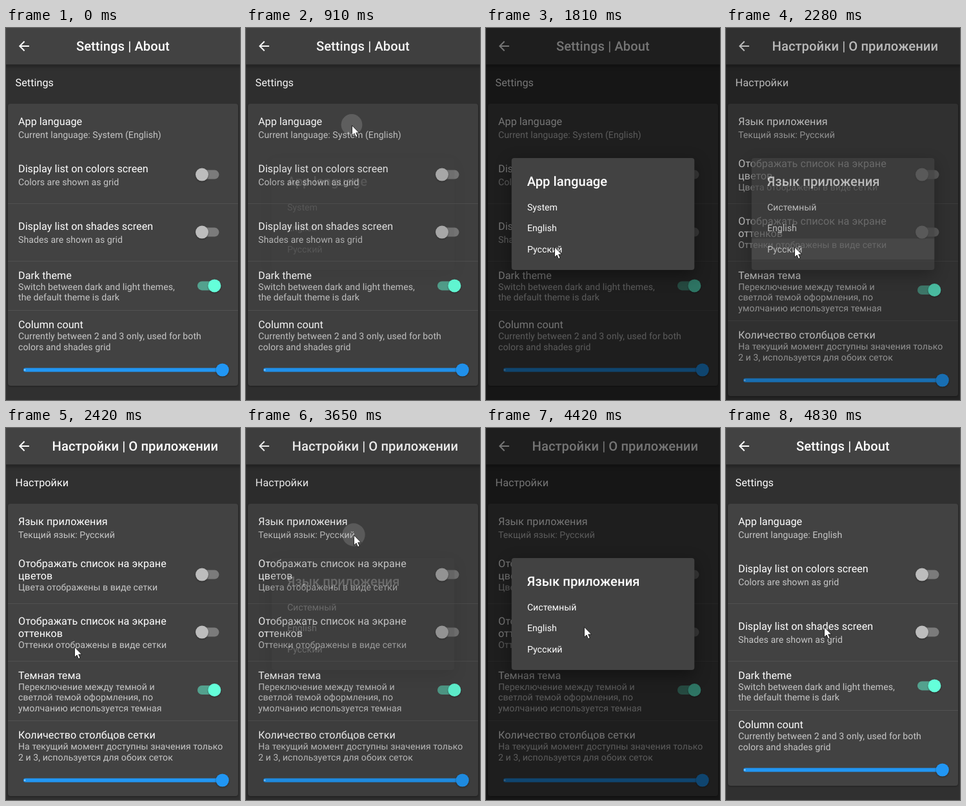
These frames come from a looping animation (363x575 px, 5.49 s). An HTML page:

```html
<!DOCTYPE html>
<html lang="en">
<head>
<meta charset="utf-8">
<title>Settings</title>
<style>
html, body { margin: 0; width: 100%; height: 100%; overflow: hidden; background: #303030; }
svg { display: block; width: 363px; height: 575px; }
text { font-family: Roboto, "Noto Sans", sans-serif; fill: #fff; white-space: pre; text-rendering: geometricPrecision; }
.bar { font-size: 20.16px; font-weight: 500; letter-spacing: .07px; }
.row { font-size: 16.13px; letter-spacing: .06px; }
.sub { font-size: 14.12px; letter-spacing: .05px; fill-opacity: .7; }
.opt { font-size: 14.12px; letter-spacing: .05px; }
.top { filter: drop-shadow(0 2px 3px rgba(0,0,0,.4)); }
.card { filter: drop-shadow(0 1px 1px rgba(0,0,0,.35)); }
.knob { filter: drop-shadow(0 1px 1px rgba(0,0,0,.4)); }
.box { filter: drop-shadow(0 8px 12px rgba(0,0,0,.4)); }
</style>
</head>
<body>
<svg id="stage" viewBox="0 0 363 575" xmlns="http://www.w3.org/2000/svg"></svg>
<script>
const LOOP = 5490;

const label = (cls, x, y, s, id = '') =>
  `<text class="${cls}" x="${x}" y="${y}" ${id && `id="${id}"`}>${s}</text>`;

const toggle = (y, on) => `
  <rect x="297" y="${y - 7}" width="33.5" height="14" rx="7" fill="${on ? '#64ffda' : '#fff'}" fill-opacity="${on ? .5 : .3}"/>
  <circle class="knob" cx="${on ? 323.4 : 304}" cy="${y}" r="10" fill="${on ? '#64ffda' : '#bdbdbd'}"/>`;

const slider = y => `
  <rect x="27" y="${y - 3}" width="309" height="6" rx="3" fill="#2196f3"/>
  <circle cx="29.2" cy="${y}" r="1" fill="#fff" fill-opacity=".8"/>
  <circle class="knob" cx="335.7" cy="${y}" r="10.1" fill="#2196f3"/>`;

const divider = y => `<rect x="3" y="${y}" width="357" height="1" fill="#fff" fill-opacity=".08"/>`;

// rows: [class, baseline, text]
const page = p => `
  <g id="${p.id}">
    <rect class="card" x="3" y="117" width="357" height="${p.end - 117}" rx="4" fill="#424242"/>
    ${[271, 360, p.split].map(divider).join('')}
    ${label('bar', p.titleX, 35, p.title)}
    ${label('row', 14.6, 90.3, p.head)}
    ${p.rows.map(([c, y, s], i) => label(c, 19, y, s, i === 1 ? p.id + 'Now' : '')).join('')}
    ${toggle(226.6, false)}${toggle(315.6, false)}${toggle(p.themeY, true)}
    ${slider(p.end - 24.5)}
  </g>`;

const menu = (id, title, first) => `
  <g id="${id}">
    ${label('bar', 63.7, 244, title)}
    ${[first, 'English', 'Русский'].map((s, i) => label('opt', 63.9, 282 + i * 32.4, s)).join('')}
  </g>`;

const english = {
  id: 'en', end: 553, split: 436, themeY: 398.4, titleX: 108.9,
  title: 'Settings | About', head: 'Settings',
  rows: [
    ['row', 149.6, 'App language'],
    ['sub', 170, 'Current language: System (English)'],
    ['row', 222.6, 'Display list on colors screen'],
    ['sub', 243, 'Colors are shown as grid'],
    ['row', 312, 'Display list on shades screen'],
    ['sub', 332.3, 'Shades are shown as grid'],
    ['row', 388, 'Dark theme'],
    ['sub', 405, 'Switch between dark and light themes,'],
    ['sub', 421.4, 'the default theme is dark'],
    ['row', 464.2, 'Column count'],
    ['sub', 481.4, 'Currently between 2 and 3 only, used for both'],
    ['sub', 497.6, 'colors and shades grid']
  ]
};

const russian = {
  id: 'ru', end: 569, split: 452, themeY: 405, titleX: 71.5,
  title: 'Настройки | О приложении', head: 'Настройки',
  rows: [
    ['row', 149.6, 'Язык приложения'],
    ['sub', 170, 'Текщий язык: Русский'],
    ['row', 214.8, 'Отображать список на экране'],
    ['row', 233.8, 'цветов'],
    ['sub', 251, 'Цвета отображены в виде сетки'],
    ['row', 304, 'Отображать список на экране'],
    ['row', 323, 'оттенков'],
    ['sub', 340.2, 'Оттенки отображены в виде сетки'],
    ['row', 388, 'Темная тема'],
    ['sub', 405, 'Переключение между темной и'],
    ['sub', 421.4, 'светлой темой оформления, по'],
    ['sub', 437.8, 'умолчанию используется темная'],
    ['row', 480, 'Количество столбцов сетки'],
    ['sub', 497.4, 'На текущий момент доступны значения только'],
    ['sub', 513.8, '2 и 3, используется для обоих сеток']
  ]
};

const stage = document.getElementById('stage');
stage.innerHTML = `
  <clipPath id="tile"><rect x="3" y="117" width="357" height="68" rx="4"/></clipPath>
  <rect width="363" height="575" fill="#303030"/>
  <rect class="top" x="-10" y="-10" width="383" height="66.4" fill="#424242"/>
  <path d="M20 11H7.83l5.59-5.59L12 4l-8 8 8 8 1.41-1.41L7.83 13H20v-2z" transform="translate(15.9 16)" fill="#fff"/>
  ${page(english)}${page(russian)}
  <g clip-path="url(#tile)"><circle id="splash" fill="#fff"/></g>
  <rect id="shade" width="363" height="575"/>
  <g id="dialog">
    <rect class="box" x="39.7" y="201" width="283.6" height="173" rx="4" fill="#424242"/>
    <rect id="press" x="39.7" width="283.6" height="32.4" fill="#ccc"/>
    ${menu('enMenu', 'App language', 'System')}
    ${menu('ruMenu', 'Язык приложения', 'Системный')}
  </g>
  <path id="cursor" d="M.4.6V16.4L4 13 6.5 18.8 9.2 17.6 6.7 12H11.6Z" fill="#fff" stroke="#111" stroke-width=".9"/>`;

const $ = id => document.getElementById(id);
const clamp = v => Math.min(1, Math.max(0, v));
const show = (id, on) => $(id).setAttribute('display', on ? 'inline' : 'none');

// pointer stops: time, x, y
const route = [
  [130, 310, 560], [620, 164, 150], [1180, 164, 150], [1740, 108, 334],
  [1810, 106, 338], [2950, 106, 338], [3440, 166, 156], [3580, 167, 165],
  [3720, 167, 165], [4350, 152, 307]
];

function pointer(t) {
  const i = route.findIndex(s => s[0] > t);
  if (i < 0) return route[route.length - 1].slice(1);
  if (i === 0) return route[0].slice(1);
  const [a, b] = [route[i - 1], route[i]];
  const p = (t - a[0]) / (b[0] - a[0]);
  const e = (1 - Math.cos(Math.PI * p)) / 2;
  return [a[1] + (b[1] - a[1]) * e, a[2] + (b[2] - a[2]) * e];
}

const starts = [4760, 3020, 2140, 130];
function snap(t) {
  const s = starts.find(v => v <= t);
  return s === undefined ? 0 : s + Math.floor((t - s) / 70) * 70;
}

const rise = (t, from) => { const p = clamp((t - from + 20) / 150); return p * (1.15 - .15 * p); };
const fall = (t, from) => clamp(1 - (t - from + 70) / 140);

function draw(time) {
  const t = snap(time);
  const second = t >= 3020;
  const openAt = second ? 3650 : 910;
  const open = rise(t, openAt) * fall(t, second ? 4760 : 2280);

  const ru = t >= 2280 && t < 4760;
  show('en', !ru);
  show('enMenu', !ru);
  show('ru', ru);
  show('ruMenu', ru);
  $('enNow').textContent = 'Current language: ' + (t >= 4760 ? 'English' : 'System (English)');

  $('shade').setAttribute('fill-opacity', .54 * open);
  $('dialog').setAttribute('opacity', 1 - (1 - open) ** 1.6);

  const age = t - openAt;
  const lit = age >= -70 && age < 210;
  $('splash').setAttribute('cx', second ? 167 : 164);
  $('splash').setAttribute('cy', second ? 165 : 149.5);
  $('splash').setAttribute('r', lit ? 17.7 + age * (age > 0 ? .5 : .13) : 0);
  $('splash').setAttribute('fill-opacity', .17 * clamp(1 - age / 210));

  const tap = t - (second ? 4490 : 2140);
  $('press').setAttribute('y', second ? 293 : 325.4);
  $('press').setAttribute('fill-opacity', tap < 0 ? 0 : .12 * clamp((tap + 70) / 210));

  const [x, y] = pointer(t);
  show('cursor', t >= 130);
  $('cursor').setAttribute('transform', `translate(${x} ${y})`);
}

const begin = performance.now();
function tick() {
  draw((performance.now() - begin) % LOOP);
  requestAnimationFrame(tick);
}
tick();
</script>
</body>
</html>
```
